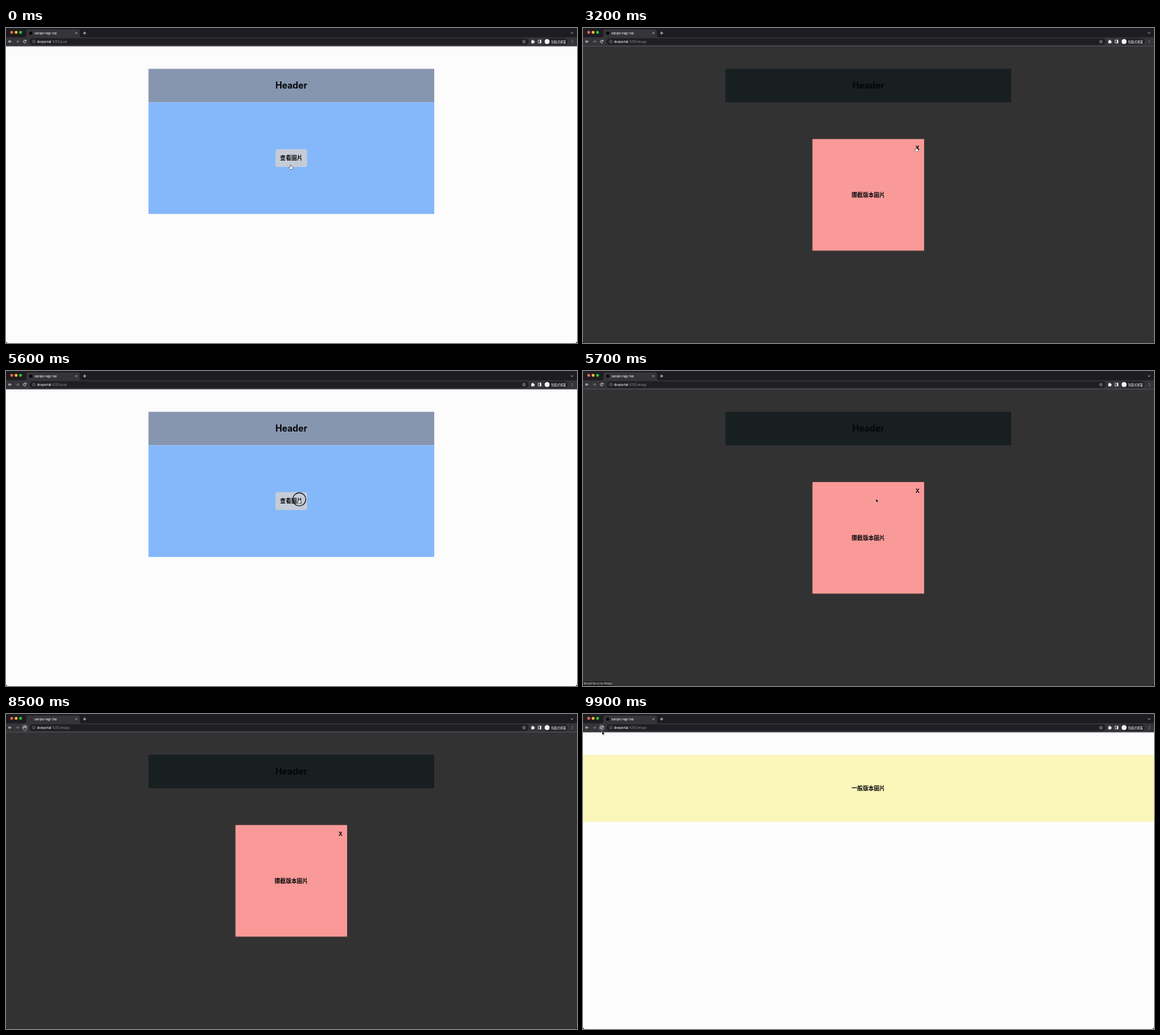
Write an HTML page with a canvas that moves like this. It is 800 px wide and 442 px high and loops after 10 s.

```html
<!DOCTYPE html>
<html lang="zh-Hant">
<head>
<meta charset="utf-8">
<title>Demo</title>
<style>
html, body { margin: 0; width: 100%; height: 100%; overflow: hidden; background: #fdfcfd; }
canvas { display: block; width: 800px; height: 442px; }
</style>
</head>
<body>
<canvas id="stage"></canvas>
<script>
const W = 800, H = 442, LOOP = 10000, STEP = 100;
const canvas = document.getElementById('stage');
const dpr = window.devicePixelRatio || 1;
canvas.width = W * dpr;
canvas.height = H * dpr;
const c = canvas.getContext('2d');
c.scale(dpr, dpr);

const FONT = 'Inter, "Noto Sans CJK TC", "Noto Sans CJK JP", "Noto Sans CJK", sans-serif';
const HOST = 'devportal';

// Pointer tip: time, x, y
const path = [
  [0, 399, 192.3], [200, 400.3, 188], [1800, 400.3, 188], [2700, 467, 167.8],
  [4600, 467, 167.8], [5400, 410.6, 179.6], [6500, 410.6, 179.6], [6800, 246, 85],
  [6900, 246, 85], [7200, 104, 47.5], [7300, 104, 47.5], [7500, 24.5, 19.5],
  [7600, 24.5, 19.5], [8200, 25.5, 18.8], [9700, 25.5, 18.8], [9900, 27, 24.6]
];
const clicks = [[400, 600], [3000, 3200], [5500, 5700]];

const within = (t, a, b) => t >= a && t < b;
const ease = p => p * p * (3 - 2 * p);

function pointerAt(t) {
  let i = path.length - 1;
  while (path[i][0] > t) i--;
  const a = path[i], b = path[i + 1];
  if (!b) return [a[1], a[2]];
  const p = ease((t - a[0]) / (b[0] - a[0]));
  return [a[1] + (b[1] - a[1]) * p, a[2] + (b[2] - a[2]) * p];
}

function rect(x, y, w, h, color) {
  c.fillStyle = color;
  c.fillRect(x, y, w, h);
}

function round(x, y, w, h, r, color) {
  c.fillStyle = color;
  c.beginPath();
  c.roundRect(x, y, w, h, r);
  c.fill();
}

function disc(x, y, r, color) {
  c.fillStyle = color;
  c.beginPath();
  c.arc(x, y, r, 0, 7);
  c.fill();
}

function line(color, width, ...pts) {
  c.strokeStyle = color;
  c.lineWidth = width;
  c.beginPath();
  for (let i = 0; i < pts.length; i += 2) c.lineTo(pts[i], pts[i + 1]);
  c.stroke();
}

function arc(x, y, r, from, to, color, width) {
  c.strokeStyle = color;
  c.lineWidth = width;
  c.beginPath();
  c.arc(x, y, r, from, to);
  c.stroke();
}

function text(s, x, y, size, color, weight = 400, align = 'left') {
  c.font = `${weight} ${size}px ${FONT}`;
  c.fillStyle = color;
  c.textAlign = align;
  c.fillText(s, x, y);
  return c.measureText(s).width;
}

const title = (s, y, size = 7.8) => text(s, 399.7, y, size, '#050608', 700, 'center');

function header(color) {
  rect(199.6, 57.3, 400.4, 46.9, color);
  title('Header', 85, 12.5);
}

function feedPage() {
  rect(0, 25, W, H - 25, '#fdfcfd');
  header('#8796af');
  rect(199.6, 104.2, 400.4, 156.7, '#85b8fb');
  round(377.5, 170, 44.4, 25, 3, '#c5ccd8');
  title('查看圖片', 185.3);
}

function modalPage() {
  rect(0, 25, W, H - 25, '#333233');
  header('#181f21');
  rect(321.5, 155.8, 156.4, 156.6, '#fa9a98');
  title('攔截版本圖片', 236.9);
  text('X', 468.7, 170.8, 7.8, '#050608', 700, 'center');
}

function photoPage() {
  rect(0, 25, W, H - 25, '#fdfcfd');
  rect(0, 57.3, W, 93.9, '#fbf6b9');
  title('一般版本圖片', 106.9);
}

function tabStrip(loading) {
  rect(0, 0, W, 13, '#1d1c20');
  c.fillStyle = '#353439';
  c.beginPath();
  c.moveTo(26, 13);
  c.quadraticCurveTo(28.5, 13, 28.5, 10.5);
  c.lineTo(28.5, 4.5);
  c.quadraticCurveTo(28.5, 2, 31, 2);
  c.lineTo(101, 2);
  c.quadraticCurveTo(103.5, 2, 103.5, 4.5);
  c.lineTo(103.5, 10.5);
  c.quadraticCurveTo(103.5, 13, 106, 13);
  c.fill();
  ['#fe5f57', '#febc2e', '#28c840'].forEach((col, i) => disc(8 + i * 6.2, 6.1, 2.1, col));
  if (!loading) disc(34.7, 7.2, 2.2, '#000');
  text('Sample Page Tab', 39.7, 8.5, 3.8, '#e6e6e8', 500);
  line('#dcdcde', 0.6, 97.3, 5.9, 99.7, 8.3);
  line('#dcdcde', 0.6, 99.7, 5.9, 97.3, 8.3);
  line('#e8e8ea', 0.8, 108, 7.1, 112.4, 7.1);
  line('#e8e8ea', 0.8, 110.2, 4.9, 110.2, 9.3);
  line('#e0e0e2', 0.8, 791.4, 6.3, 793, 7.9, 794.6, 6.3);
}

function arrowIcon(x, dir, color) {
  line(color, 0.8, x - 2.2, 19, x + 2.2, 19);
  line(color, 0.8, x + dir * 0.2, 17, x + dir * 2.2, 19, x + dir * 0.2, 21);
}

function star(x, y) {
  const pts = [];
  for (let i = 0; i <= 10; i++) {
    const a = i * Math.PI / 5 - Math.PI / 2, r = i % 2 ? 1.1 : 2.4;
    pts.push(x + r * Math.cos(a), y + r * Math.sin(a));
  }
  line('#d8d8da', 0.5, ...pts);
}

function toolbar(route, hover) {
  rect(0, 13, W, 12.4, '#353439');
  round(33, 14.4, 699, 9.4, 4.7, '#1f1e22');
  arrowIcon(5.8, -1, '#f0f0f2');
  arrowIcon(16, 1, '#85848a');
  if (hover) disc(26.2, 19, 4.5, '#56555b');
  arc(26.2, 19, 1.9, 0.5, 5.5, '#f0f0f2', 0.8);
  line('#f0f0f2', 0.8, 28.2, 16.7, 28.2, 18.4, 26.5, 18.4);

  arc(39.1, 19, 2, 0, 7, '#a5a5a9', 0.5);
  line('#a5a5a9', 0.5, 39.1, 18.7, 39.1, 20.1);
  disc(39.1, 18, 0.3, '#a5a5a9');
  const w = text(HOST, 43.6, 20.6, 4.3, '#f2f2f4', 500);
  text(':4200/' + route, 43.6 + w, 20.6, 4.3, '#8e8d93');

  star(725.7, 19.2);
  round(736, 17.6, 3.8, 3.8, 0.5, '#f0f0f2');
  disc(737.8, 17.5, 0.9, '#f0f0f2');
  disc(740, 19.4, 0.9, '#f0f0f2');
  c.strokeStyle = '#f0f0f2';
  c.lineWidth = 0.7;
  c.strokeRect(745.7, 17, 4, 4);
  rect(747.9, 17, 1.8, 4, '#f0f0f2');
  round(753.5, 14.6, 33.5, 9, 4.5, '#1f1e22');
  disc(758.1, 19.1, 3.5, '#f4f4f6');
  text('無痕式視窗', 763.8, 20.7, 4.2, '#f4f4f6', 500);
  for (let i = -1; i < 2; i++) disc(793.3, 19 + i * 1.7, 0.45, '#e8e8ea');
  rect(0, 25, W, 0.7, '#59585d');
}

function statusBar(t) {
  const first = within(t, 600, 1300), second = within(t, 5700, 6000);
  if (!first && !second) return;
  c.globalAlpha = Math.min(1, ((first ? 1300 : 6000) - t) / 300);
  round(-2, 435.4, first ? 268.5 : 42.4, 9, 1.5, '#211f22');
  text(HOST + ':4200/image', 0.8, 440.3, 3.8, '#e4e4e6');
  c.globalAlpha = 1;
}

function outline(fill, edge, width) {
  c.lineJoin = 'round';
  c.strokeStyle = edge;
  c.lineWidth = width;
  c.stroke();
  c.fillStyle = fill;
  c.fill();
  c.lineJoin = 'miter';
}

function arrowPointer(x, y) {
  c.beginPath();
  [[0, 0], [0, 4.4], [1, 3.5], [1.7, 5.1], [2.4, 4.8], [1.7, 3.3], [3.1, 3.2]]
    .forEach(([dx, dy]) => c.lineTo(x + dx, y + dy));
  c.closePath();
  outline('#000', '#fff', 0.7);
}

function handPointer(x, y) {
  c.beginPath();
  [[-0.6, 0], [0.2, 0], [0.4, 2], [2.6, 2.6], [2.7, 4], [2, 5.6], [-0.6, 5.6],
   [-2.2, 3.4], [-1.7, 2.9], [-0.7, 3.6]].forEach(([dx, dy]) => c.lineTo(x + dx, y + dy));
  c.closePath();
  outline('#fff', '#000', 0.8);
}

function pointer(t, page) {
  const [x, y] = pointerAt(t);
  const onButton = page === 'feed' && x > 377 && x < 422 && y > 170 && y < 195;
  const onClose = page === 'modal' && x > 465 && x < 473 && y < 173 && y > 163;
  (onButton || onClose ? handPointer : arrowPointer)(x, y);
  if (clicks.some(([a, b]) => within(t, a, b))) arc(x + 0.3, y + 0.5, 9.2, 0, 7, '#0a0a0c', 1.1);
}

function corners() {
  c.fillStyle = '#000';
  for (const [x, dir] of [[0, 1], [W, -1]]) {
    c.beginPath();
    c.moveTo(x, H);
    c.lineTo(x, H - 2.4);
    c.quadraticCurveTo(x, H, x + dir * 2.4, H);
    c.fill();
  }
}

const pages = { feed: feedPage, modal: modalPage, photo: photoPage };

function pageAt(t) {
  if (t >= 8600) return 'photo';
  return within(t, 600, 3300) || t >= 5700 ? 'modal' : 'feed';
}

function draw(t) {
  const page = pageAt(t);
  pages[page]();
  tabStrip(within(t, 8400, 8900));
  toolbar(page === 'feed' ? 'post' : 'image', t >= 7500);
  statusBar(t);
  corners();
  pointer(t, page);
}

const start = performance.now();
function tick() {
  const t = (performance.now() - start) % LOOP;
  draw(Math.floor(t / STEP) * STEP);
  requestAnimationFrame(tick);
}
tick();
</script>
</body>
</html>
```
